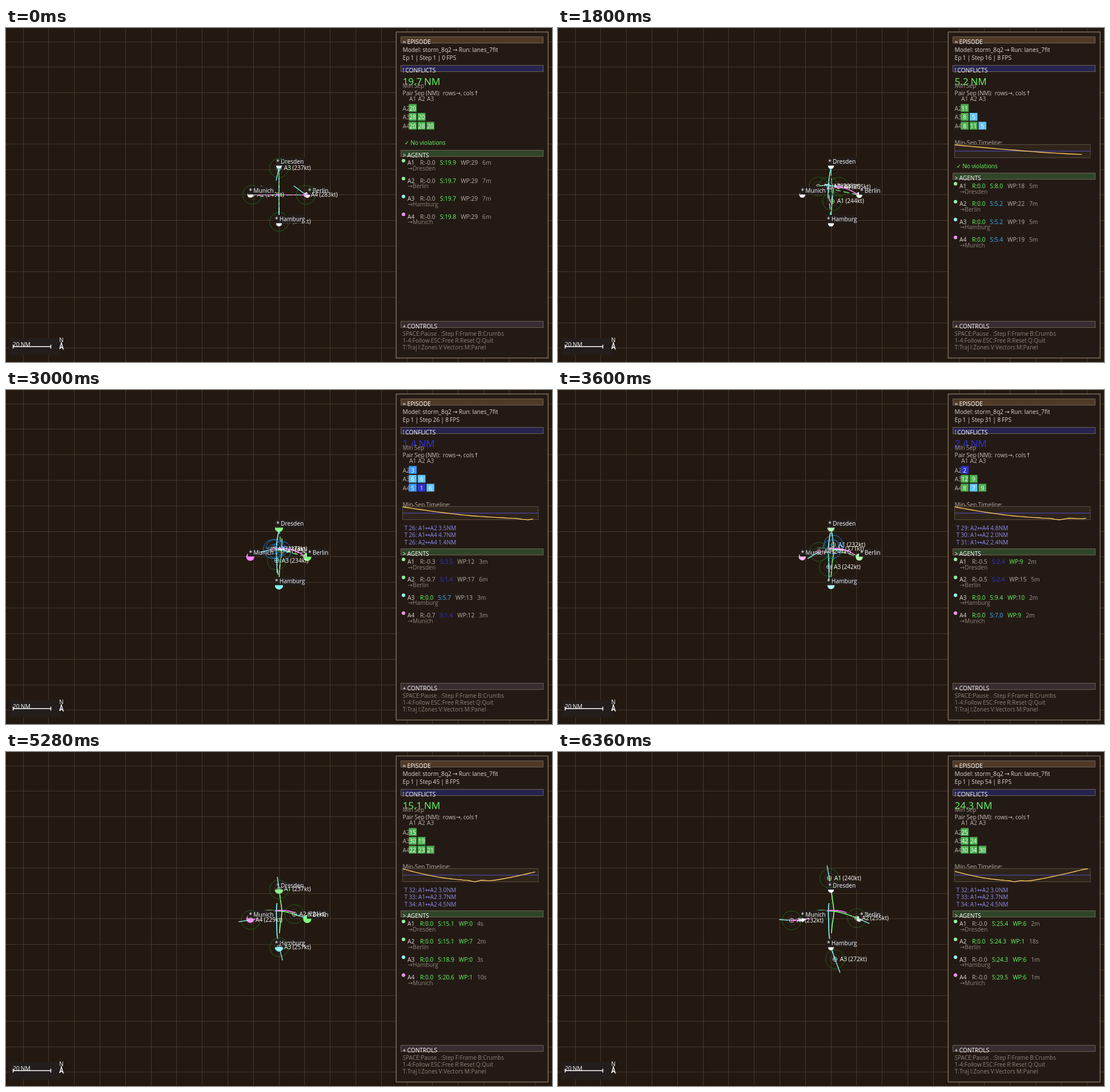
An HTML page with a canvas for the animation above (6480 ms loop, 956 px wide and 586 px high).

```html
<!DOCTYPE html>
<html lang="en">
<head>
<meta charset="utf-8">
<style>
  html, body { margin: 0; width: 100%; height: 100%; overflow: hidden; background: #231910; }
  canvas { display: block; }
</style>
</head>
<body>
<canvas id="stage" width="956" height="586"></canvas>
<script>
const ctx = document.getElementById('stage').getContext('2d');
const STEPS = 54, STEP_MS = 120, PX_PER_NM = 3.36, STEPS_PER_HOUR = 360;
const FONT = '"Open Sans", "Noto Sans", "DejaVu Sans", sans-serif';
const GREEN = '#64ff64', BLUE = '#3232dc', SKY = '#3cb4ff';
const DIM = '#8c847c', SOFT = '#b9b2aa', LIGHT = '#dcd7d2', LABEL_BG = '#231d1c';

// Each agent flies a smooth curve through its waypoints, reached at the key steps.
const KEYS = [1, 16, 26, 37, 54];
const agents = [
  { name: 'A1', rgb: [128, 255, 128], city: 'Dresden', dest: [478, 242],
    path: [[478, 340.1], [480, 304], [482.9, 282.2], [480.5, 258.5], [475, 221.3]] },
  { name: 'A2', rgb: [128, 255, 128], city: 'Berlin', dest: [527.5, 293],
    path: [[431, 292.5], [456, 278], [471.9, 278.5], [489.8, 280.5], [523.4, 291.5]] },
  { name: 'A3', rgb: [128, 255, 255], city: 'Hamburg', dest: [478, 343],
    path: [[478, 245.9], [473.5, 278], [474, 299.2], [475, 324], [485, 363.6]] },
  { name: 'A4', rgb: [255, 128, 255], city: 'Munich', dest: [427.7, 292.6],
    path: [[525.2, 292.75], [491.6, 278.5], [467.3, 279.3], [445, 290.4], [409.1, 295.4]] }
];
const rgb = c => `rgb(${c.map(Math.round)})`;
const distance = (a, b) => Math.hypot(a[0] - b[0], a[1] - b[1]) / PX_PER_NM;

// Slope at a waypoint: that of the parabola through it and its neighbours.
function slope(path, i, c) {
  const m = Math.min(Math.max(i, 1), KEYS.length - 2);
  const rate = k => (path[k + 1][c] - path[k][c]) / (KEYS[k + 1] - KEYS[k]);
  const bend = (rate(m) - rate(m - 1)) / (KEYS[m + 1] - KEYS[m - 1]);
  return rate(m - 1) + bend * (2 * KEYS[i] - KEYS[m - 1] - KEYS[m]);
}
function positionAt({ path }, step) {
  let i = 0;
  while (i < KEYS.length - 2 && step >= KEYS[i + 1]) i++;
  const h = KEYS[i + 1] - KEYS[i], u = (step - KEYS[i]) / h, w = u * u * (3 - 2 * u);
  return [0, 1].map(c => path[i][c] * (1 - w) + path[i + 1][c] * w +
    h * u * (1 - u) * (slope(path, i, c) * (1 - u) - slope(path, i + 1, c) * u));
}
function velocityAt(agent, step) {
  const a = positionAt(agent, step - .1), b = positionAt(agent, step + .1);
  return [(b[0] - a[0]) * 5, (b[1] - a[1]) * 5];
}

const history = [null], violations = [];
for (let step = 1; step <= STEPS; step++) {
  const pos = agents.map(a => positionAt(a, step));
  const vel = agents.map(a => velocityAt(a, step));
  const speed = vel.map(v => Math.hypot(...v) / PX_PER_NM * STEPS_PER_HOUR);
  const sep = pos.map((p, i) => Math.min(...pos.filter((_, j) => j !== i).map(q => distance(p, q))));
  history.push({ pos, vel, speed, sep, min: Math.min(...sep) });
  for (let i = 0; i < 4; i++) for (let j = i + 1; j < 4; j++) {
    const d = distance(pos[i], pos[j]);
    if (d < 5) violations.push({ step, label: `T ${step}: A${i + 1}↔A${j + 1} ${d.toFixed(1)}NM` });
  }
}

function setFont(size) {
  ctx.font = `${size}px ${FONT}`;
  ctx.wordSpacing = '-0.5px';
}
// Text is placed by the middle of its capitals.
function text(str, x, y, color = LIGHT, size = 10.2, align = 'left') {
  setFont(size);
  ctx.textAlign = align;
  ctx.fillStyle = color;
  ctx.fillText(str, x, y + size * .36);
  return ctx.measureText(str).width;
}
function box(x, y, w, h, fill, stroke, width = 1) {
  ctx.fillStyle = fill;
  ctx.fillRect(x, y, w, h);
  if (!stroke) return;
  ctx.strokeStyle = stroke;
  ctx.lineWidth = width;
  ctx.strokeRect(x, y, w, h);
}
function line(points, color, width = 1, dash = []) {
  ctx.beginPath();
  points.forEach(p => ctx.lineTo(p[0], p[1]));
  ctx.strokeStyle = color;
  ctx.lineWidth = width;
  ctx.setLineDash(dash);
  ctx.stroke();
  ctx.setLineDash([]);
}
function circle([x, y], r, fill, stroke) {
  ctx.beginPath();
  ctx.arc(x, y, r, 0, 7);
  if (fill) { ctx.fillStyle = fill; ctx.fill(); }
  if (stroke) { ctx.strokeStyle = stroke; ctx.lineWidth = 1; ctx.stroke(); }
}

function drawMap() {
  box(0, 0, 956, 586, '#231910');
  for (let i = 0; i < 22; i++) {
    const x = Math.floor(30 + 44.8 * i) + .5, y = Math.floor(24 + 44.83 * i) + .5;
    line([[x, 0], [x, 586]], '#45392c');
    line([[0, y], [956, y]], '#45392c');
  }
}

function drawScale() {
  box(6, 544, 90, 30, LABEL_BG);
  text('20 NM', 12, 555.5, '#fff');
  for (const x of [12.5, 78.5]) line([[x, 555.5], [x, 562.5]], '#fff', 1.4);
  line([[12, 559], [79, 559]], '#fff', 1.6);
  text('N', 96.8, 547.5, '#fff', 10.2, 'center');
  line([[97, 554], [97, 560]], '#5a5aff', 1.4);
  line([[93.8, 563], [97, 552], [100.2, 563], [97, 559.5], [93.8, 563]], '#fff', 1.2);
}

function drawDestination({ rgb: tint, city, dest }, step) {
  const [x, y] = dest, pulse = (1 - Math.cos(step * Math.PI / 9)) / 2;
  circle(dest, 5 + 2.2 * pulse, rgb(tint.map(c => 255 + (c - 255) * pulse)));
  const label = '* ' + city;
  setFont(10.2);
  const w = ctx.measureText(label).width + 4;
  box(x + 19.3 - w / 2, y - 15, w, 14.5, LABEL_BG);
  text(label, x + 19.3, y - 7.5, '#fff', 10.2, 'center');
}

function drawAgent(agent, i, step) {
  const { pos, vel, speed, sep } = history[step], p = pos[i], color = rgb(agent.rgb);
  const [x, y] = p, [vx, vy] = vel[i], close = sep[i] < 5;
  const first = Math.max(1, Math.min(step - 28, 10));
  line(history.slice(first, step + 1).map(h => h.pos[i]), color, 1.7);
  line([p, agent.dest], color, 1.3, [10, 5]);
  drawDestination(agent, step);

  circle(p, 16.5, null, close ? '#1e82dc' : '#1f621f');
  circle(p, 8.4, null, close ? '#1e6ebe' : '#3a3436');
  line([p, [x + vx * 10, y + vy * 10]], '#96ffff', 1.3);
  circle(p, 3.8, null, '#c8c8c8');
  line([[x - 3, y], [x + 3, y]], color);
  line([[x, y - 3], [x, y + 3]], color);
  text(`${agent.name} (${Math.round(speed[i])}kt)`, x + 8.8, y - .3, '#fff');
}

function header(title, y, fill) {
  box(691.5, y + .5, 249, 11, fill, '#6e6052');
  text(title, 694.5, y + 9.8, '#fff');
}

function drawMatrix(pos) {
  for (let r = 0; r < 4; r++) {
    const y = 125 + 15.6 * r;
    if (r < 3) text('A' + (r + 1), 706 + 15.5 * r, 124.5, SOFT);
    if (r) text('A' + (r + 1), 694.5, y + .5, SOFT);
    for (let c = 0; c < r; c++) {
      const d = distance(pos[r], pos[c]), x = 705.3 + 15.5 * c;
      box(x, y - 7.2, 13.6, 13.6, d < 3 ? '#3232c8' : d < 5 ? '#3c9bff' : d < 7 ? '#64c3ff' : '#4caf50');
      text(d.toFixed(0), x + 6.8, y + .5, '#fff', 10.2, 'center');
    }
  }
}

function drawTimeline(step) {
  const mins = history.slice(1, step + 1).map(h => h.min), top = Math.max(...mins);
  text('Min-Sep Timeline:', 694.5, 201.5, SOFT);
  box(694.5, 204.5, 237.5, 23, '#2e241b', '#5c4e3f');
  line([[695, 216], [932, 216]], '#5050d2', 1.2);
  line(mins.map((m, i) => [694.5 + 237.5 * i / step, 228 - 23 * m / top]), '#ffc864', 1.4);
}

function drawAgentRow(agent, i, step, top) {
  const { pos, sep, speed } = history[step], s = sep[i];
  const nm = distance(pos[i], agent.dest), minutes = nm / speed[i] * 60;
  const receding = step === 1 || nm > distance(history[step - 1].pos[i], agent.dest);
  const reward = s < 5 ? (-(5 - s) / 5).toFixed(1) : receding ? '-0.0' : '0.0';
  const y = top + 23 + 31.4 * i;
  circle([696, y - 4], 2.8, rgb(agent.rgb), 'rgba(255,255,255,.5)');
  text(agent.name, 703, y);
  let x = 725;
  [['R:' + reward, reward[0] === '-' ? SOFT : GREEN],
   ['S:' + s.toFixed(1), s < 5 ? BLUE : s < 7 ? SKY : GREEN],
   ['WP:' + nm.toFixed(0), nm < 10 ? GREEN : SOFT],
   [minutes < 1 ? Math.round(minutes * 60) + 's' : Math.round(minutes) + 'm', '#a09890']
  ].forEach(([str, color]) => { x += text(str, x, y, color) + 8; });
  text('→' + agent.city, 703.5, y + 9.6, DIM);
}

function drawPanel(step) {
  const { pos, min } = history[step];
  box(683.2, 7, 266, 572, '#241a15', '#7c6c5c', 1.5);
  header('= EPISODE', 15, '#503927');
  text('Model: storm_8q2 → Run: lanes_7fit', 694.5, 38.5);
  text(`Ep 1 | Step ${step} | ${step > 9 ? 8 : 0} FPS`, 694.5, 52.5);

  header('! CONFLICTS', 65, '#262450');
  text(min.toFixed(1) + ' NM', 694.5, 93.5, min < 5 ? BLUE : GREEN, 17);
  text('Min Sep', 694.5, 101.3, '#a09890');
  text('Pair Sep (NM):  rows→, cols↑', 694.5, 114.7, '#c8c2bc');
  drawMatrix(pos);

  let y = 201.5;
  if (step > 1) { drawTimeline(step); y = 242; }
  const recent = violations.filter(v => v.step <= step).slice(-3);
  if (recent.length) recent.forEach((v, i) => text(v.label, 697.5, y + 12.8 * i, '#8c8cf0'));
  else text('✓ No violations', 697.5, y, GREEN);

  const top = y + 12.3 + 12 * Math.max(0, recent.length - 1);
  header('> AGENTS', Math.round(top), '#2f4629');
  agents.forEach((a, i) => drawAgentRow(a, i, step, top));

  header('+ CONTROLS', 514, '#372c2f');
  ['SPACE:Pause . :Step F:Frame B:Crumbs', '1-4:Follow ESC:Free R:Reset Q:Quit', 'T:Traj I:Zones V:Vectors M:Panel']
    .forEach((str, i) => text(str, 694.5, 536.5 + 12 * i, DIM, 10));
}

function draw() {
  const step = Math.floor(performance.now() / STEP_MS) % STEPS + 1;
  drawMap();
  agents.forEach((a, i) => drawAgent(a, i, step));
  drawScale();
  drawPanel(step);
  requestAnimationFrame(draw);
}
draw();
</script>
</body>
</html>
```
